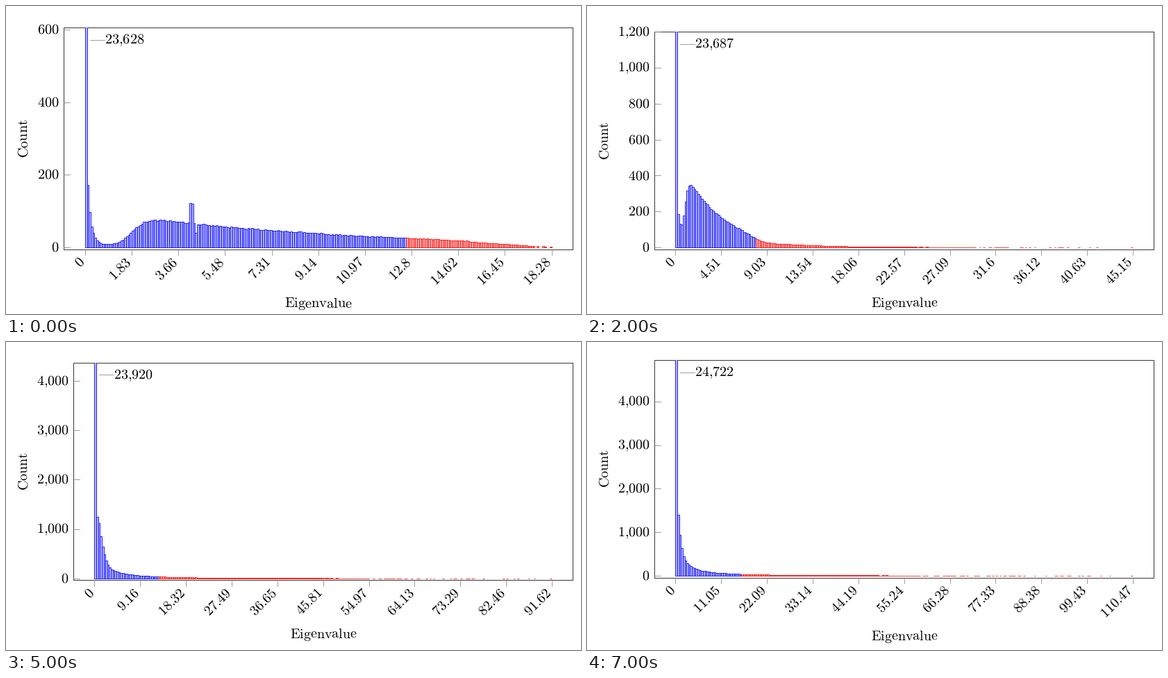
A matplotlib script that plays this animation: 828 px wide and 444 px high, repeating every 8000 ms.

```python
import numpy as np
import matplotlib.pyplot as plt
from matplotlib.animation import FuncAnimation
from matplotlib.collections import PolyCollection
from matplotlib.patches import Rectangle

W, H, DPI = 828, 444, 96
BINS = 250
RIGHT = 816.4
BLUE = ("#0000ff", "#b3b3ff")
RED = ("#ff0000", "#ffb3b3")
plt.rcParams.update({"mathtext.fontset": "cm", "text.hinting": "none"})


def logistic(i, centre, width):
    return 1 / (1 + np.exp(np.clip((centre - i) / width, -50, 50)))


def histogram(total, near, peak, fade, rise, turn, tail, reach, end, spike):
    """Spike at zero, a hump that rises and fades, then a 1/i tail."""
    rng = np.random.default_rng(total)
    i = np.arange(1, BINS)
    zero = near * (0.88 * np.exp((1 - i) / 1.6) + 0.13 * np.exp(-i / 9))
    to_tail = logistic(i, turn, 0.05 * turn + 1)
    hump = peak * np.exp(-i / fade) * (1 - to_tail)
    slope = tail / i * np.exp(-i / reach) * to_tail
    counts = zero + (hump + slope) * logistic(i, rise, 0.14 * abs(rise) + 0.35)
    counts += rng.uniform(-1, 1, BINS - 1) * np.minimum(0.03 * counts + 0.4, 2)
    counts = np.append(total, np.maximum(counts, 1).round())

    # Past the dense part, bins empty out towards the largest eigenvalue.
    far = np.arange(end, BINS - 1)
    chance = 0.1 + 0.6 * (1 - (far - end) / (BINS - end))
    counts[far[rng.random(far.size) > chance]] = 0
    counts[-1] = 1
    counts[56:58] += spike
    counts[59] -= spike / 2
    return counts


def scene(total, xmax, ymax, top=29.8, split=36, near=75, spike=0, end=150,
          **shape):
    counts = histogram(total, near=near, end=end, spike=spike, **shape)
    return dict(total=total, xmax=xmax, ymax=ymax, top=top, split=split,
                counts=counts)


scenes = [
    scene(23628, 18.28, 606, top=30.8, split=172, near=171, spike=55, end=239,
          peak=105, fade=123, rise=25, turn=224, tail=300, reach=400),
    scene(23529, 21.885, 613, top=28.9, split=102, near=173, spike=55, end=201,
          peak=194, fade=61, rise=14.3, turn=128, tail=2500, reach=110),
    scene(23687, 45.146, 1200, top=37.2, split=44, near=176,
          peak=500, fade=22.2, rise=4.7, turn=43, tail=2700, reach=65),
    scene(23707, 63.076, 2105, split=37,
          peak=960, fade=10.4, rise=2, turn=21, tail=2300, reach=62),
    scene(23792, 78.42, 3195,
          peak=1560, fade=5.6, rise=1.1, turn=13, tail=2150, reach=64),
    scene(23920, 91.618, 4371, split=35, near=10,
          peak=2000, fade=3.57, rise=0.4, turn=8, tail=2000, reach=70),
    scene(24296, 99.47, 5150, top=30.2, end=140,
          peak=2000, fade=2.9, rise=-1, turn=5.5, tail=1950, reach=75),
    scene(24722, 110.473, 4956, top=25.9, end=134,
          peak=1900, fade=2.6, rise=-2, turn=4, tail=1900, reach=85),
]

fig = plt.figure(figsize=(W / DPI, H / DPI), dpi=DPI, facecolor="white")
ax = fig.add_axes([0, 0, 1, 1])


def pt(px):
    return px * 72 / DPI


def label(x, y, s, em, **kw):
    s = s.replace(",", "{,}")
    ax.text(x, y, rf"$\mathrm{{{s}}}$", fontsize=pt(em), va="baseline",
            rotation_mode="anchor", color="black", **kw)


def rule(x0, y0, x1, y1):
    ax.plot([x0, x1], [y0, y1], color="#7f7f7f", lw=pt(0.75), snap=True)


def draw_bars(counts, first, style, x0, width, zero, unit, clip):
    quads = []
    for i, c in enumerate(counts, first):
        if c > 0:
            a, b, y = x0 + i * width, x0 + (i + 1) * width, zero - c * unit
            quads.append([(a, zero), (a, y), (b, y), (b, zero)])
    edge, fill = style
    bars = PolyCollection(quads, facecolor=fill, edgecolor=edge,
                          linewidth=pt(0.8), snap=True)
    ax.add_collection(bars, autolim=False)
    bars.set_clip_path(clip)


def draw(n):
    sc = scenes[n]
    top, ymax, xmax, split = (sc[k] for k in ("top", "ymax", "xmax", "split"))
    ax.clear()
    ax.set(xlim=(0, W), ylim=(H, 0))
    ax.axis("off")

    # Short count labels leave room for a wider plot at a larger scale.
    em, left, height = (20.35, 83.4, 319.8) if ymax < 1000 else (20, 97.4, 313.6)
    bottom = top + height
    zero = bottom - 2.7
    unit = (zero - top) / ymax
    x0 = left + 1.5 * em
    span = RIGHT - x0 - 1.5 * em - 0.3
    half = 0.28 * em
    tick = 0.42 * em

    for k in range(11):
        x = x0 + span * k / 10
        rule(x, bottom, x, bottom + tick)
        s = f"{xmax * k / 10:.2f}".rstrip("0").rstrip(".") or "0"
        label(x + 0.3, bottom + 0.93 * em, s, em, ha="right", rotation=45)
    step = next(s for s in (200, 500, 1000) if ymax / s <= 6)
    for v in range(0, ymax + 1, step):
        y = zero - v * unit
        rule(left, y, left + tick, y)
        label(left - 0.34 * em, y + half, f"{v:,}", em, ha="right")

    size = (RIGHT - left, height)
    ax.add_patch(Rectangle((left, top), *size, fill=False,
                           edgecolor="#222222", lw=pt(0.9)))
    clip = Rectangle((left, top), *size, transform=ax.transData)
    grid = (x0, span / BINS, zero, unit, clip)
    draw_bars(sc["counts"][:split], 0, BLUE, *grid)
    draw_bars(sc["counts"][split:], split, RED, *grid)

    pin = top + 0.88 * em
    rule(x0 + 7, pin, x0 + 1.37 * em, pin)
    label(x0 + 1.37 * em, pin + half, f"{sc['total']:,}", em, ha="left")

    drop = 4.5 if xmax >= 100 else 4.15
    label((left + RIGHT) / 2, bottom + drop * em, "Eigenvalue", em,
          ha="center")
    label(31.2, (top + bottom) / 2, "Count", em, ha="center", rotation=90)
    return []


anim = FuncAnimation(fig, draw, frames=len(scenes), interval=1000,
                     init_func=lambda: [], repeat=True, repeat_delay=0)
plt.show()
```
